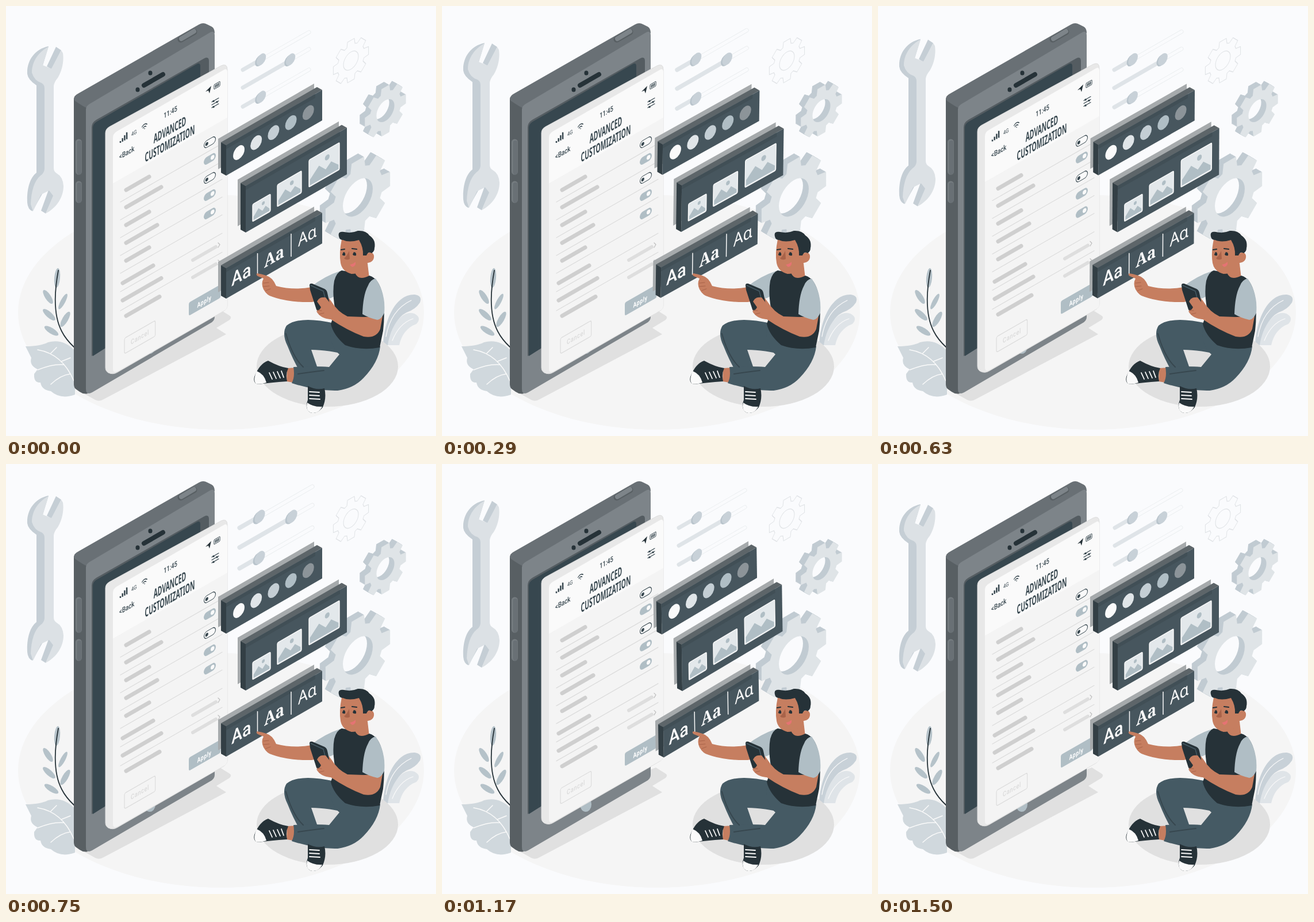
An HTML page that plays this animation: 748 by 748 pixels, repeating every 1540 ms.

```html
<!DOCTYPE html>
<html lang="en">
<head>
<meta charset="utf-8">
<style>
  html, body { margin: 0; width: 100%; height: 100%; overflow: hidden; background: #fafbfd; }
  svg { display: block; width: 100vw; height: 100vh; }
  text { font-family: Roboto, Arial, sans-serif; fill: #37474f; }
  .title { font: bold 22px "Noto Sans", sans-serif; text-anchor: middle; }
  .mid { text-anchor: middle; }
  .line { fill: none; stroke-linecap: round; stroke-linejoin: round; }
  .skin { fill: #c67e60; }
  .dark { fill: #263238; }
  .sleeve { fill: #b0bec5; }
  .pants { fill: #455a64; }
</style>
</head>
<body>
<svg viewBox="0 0 748 748">
  <ellipse cx="374" cy="533" rx="353" ry="204" fill="#f5f5f5"/>
  <g id="sliders"></g>
  <g id="gears"></g>
  <g id="wrench">
    <path fill="#c5ced5" d="M74 70C50 75 36 95 37 118Q38 128 53 138V290C41 299 36 320 37 342Q38 354 46 357L68 318V130L64 103ZM96 77L87 71L71 105L79 110ZM69 361L61 356L74 320L84 327Z"/>
    <path fill="#dce1e5" d="M74 71C58 79 45 95 45 116Q49 130 62 134Q67 137 67 143V284Q66 291 60 295C49 304 44 322 43 345L47 357L61 328L75 321L82 330L69 361C88 351 100 333 100 313Q99 297 88 291Q83 288 83 282V139Q84 132 90 125C98 112 101 95 99 82L96 77L79 109L64 103Z"/>
  </g>

  <path fill="#d0d8dd" d="M34 592Q60 592 73 585Q100 578 120 600V676Q95 685 78 670Q62 668 60 655Q48 656 49 640L55 632Q40 625 44 612Z"/>
  <path class="line" stroke="#fafafa" stroke-width="1.5" d="M55 598Q98 605 118 652M78 604L88 594M97 618L112 612M55 633Q82 622 101 624M78 658Q95 642 112 640"/>
  <g id="sprig" fill="#b5c2c9"></g>
  <path class="line" stroke="#263238" stroke-width="1.8" d="M91 460Q78 530 97 566Q104 580 119 594"/>

  <path fill="#c8d1d8" d="M656 590C658 545 678 501 711 502Q725 504 720 516Q712 528 697 533C676 544 672 566 669 590Z"/>
  <path fill="#dfe4e8" d="M664 590C670 553 690 529 710 535Q724 542 714 553Q690 562 684 590Z"/>
  <path class="line" stroke="#fafafa" stroke-width="1.2" d="M661 575Q669 529 705 512M672 582Q684 552 708 544"/>

  <path fill="#e0e0e0" d="M137 675L155 685Q162 689 170 684L383 571L366 560L389 546Q394 541 388 538L372 528L340 540Z"/>
  <path fill="#585f63" d="M118 160L142 174V674Q135 676 128 671L121 666Q118 663 118 658Z"/>
  <path fill="#697075" d="M118 162Q118 156 126 152L336 32Q343 28 350 32L358 36Q363 39 363 47L140 177Q136 176 120 165Z"/>
  <path fill="#7d8489" d="M139 180Q139 174 146 170L355 46Q363 42 363 51V541Q363 548 355 552L150 672Q139 678 139 666Z"/>
  <path fill="#545c61" d="M149 211Q149 203 157 198L345 91Q353 87 353 96V490L149 609Z"/>
  <path fill="#37474f" d="M151 212Q151 205 158 201L332 101Q338 98 338 105V490L151 609Z"/>
  <g class="line" stroke="#263238">
    <path stroke-width="8" d="M240 138L273 119"/>
    <path stroke-width="7" d="M251 116v1M229 145v1"/>
  </g>
  <path class="line" stroke="#585f63" stroke-width="11" d="M304 58L327 45"/>
  <path class="line" stroke="#7d8489" stroke-width="8" d="M305 57L327 44"/>
  <path class="line" stroke="#757c80" stroke-width="11" d="M126.500 237V288M126.500 310V337"/>
  <path class="line" stroke="#697075" stroke-width="8" d="M127.500 238V289M127.500 311V338"/>
  <ellipse cx="250" cy="592" rx="10" ry="13" fill="#b0bec5"/>

  <g id="card">
    <path fill="#e8e8e8" stroke="#dedede" d="M173 221Q173 214 180 210L374 104Q385 99 385 111V521Q385 527 378 531L194 637Q186 642 178 638Q173 635 173 629Z"/>
    <path fill="#fafafa" d="M186 229Q186 222 193 218L379 111Q385 108 385 115V196L186 309Z"/>
    <path fill="#f4f4f4" d="M186 309L385 194V522Q385 527 379 530L195 635Q186 640 186 631Z"/>
    <g id="content"></g>
  </g>

  <g id="panels"></g>

  <ellipse cx="559" cy="627" rx="123" ry="70" fill="#e0e0e0"/>
  <g id="person">
    <path class="skin" d="M526 658L555 660L554 672L529 672ZM489 630L505 629V656L488 653Z"/>
    <path class="pants" d="M572 552Q510 538 488 556Q479 570 490 592Q505 630 524 655V662Q540 670 556 664L561 648L541 627L531 598Q560 598 600 608Z"/>
    <path class="pants" d="M566 554Q600 560 651 592Q648 620 622 647Q605 665 577 669Q540 670 497 656Q503 645 500 628Q540 626 562 628L580 606Q560 590 566 554Z"/>
    <path class="line" stroke="#37474f" stroke-width="2" d="M553 634Q528 637 508 640M487 570Q498 610 517 628"/>
    <path class="dark" d="M456 617Q476 628 491 630Q486 640 489 653Q460 655 440 658Q429 657 432 645Q441 622 456 617ZM525 661Q540 669 554 665Q558 682 551 698Q541 711 529 707Q519 701 525 685Z"/>
    <path fill="#fafafa" d="M436 635Q449 640 453 655Q442 659 435 657Q429 652 436 635ZM524 690Q535 698 550 697Q544 709 533 708Q520 706 524 690Z"/>
    <path class="line" stroke="#fafafa" stroke-width="1.800" d="M458 638l5 11M465 637l5 11M472 636l5 11M479 635l4 11M528 683l18 1M528 677l17 1M528 671l17 1"/>

    <path class="skin" d="M532 489Q500 495 470 487Q464 472 453 469Q444 466 437 465Q434 467 438 470L448 474Q443 483 448 493Q454 504 464 506Q492 516 532 515Q552 511 563 500Z"/>
    <path class="line" stroke="#a96349" stroke-width="1" d="M448 482L457 481M448 488L458 487M452 495L460 492"/>
    <path class="sleeve" d="M584 460Q553 470 530 489Q540 500 541 514Q560 512 575 503Z"/>

    <path class="skin" d="M607 450L629 448L632 474Q618 487 606 474Z"/>
    <path class="dark" d="M584 460Q595 462 607 464Q613 479 632 469Q649 474 655 502Q660 530 656 565L650 594Q618 600 590 590Q569 572 565 553L573 530Q567 500 571 478Q575 463 584 460Z"/>
    <path class="skin" d="M584 406Q579 430 582 447Q585 462 601 466Q622 466 629 447Q641 445 640 434Q638 426 629 430L624 406Z"/>
    <path fill="#a96349" d="M597 426Q593 435 588 439Q592 443 598 440Z"/>
    <path class="line" stroke="#263238" stroke-width="2.200" d="M583 424l6-1M602 422l8 1"/>
    <path class="dark" d="M587 428q4 0 3 6q-5 1-5-2ZM605 428q5 0 4 6q-5 1-6-2Z"/>
    <path fill="#e57373" d="M598 450Q604 449 608 445Q609 453 602 454Z"/>
    <path class="dark" d="M580 404Q575 391 588 393Q601 396 612 391Q626 390 632 399Q644 407 641 421Q641 427 636 430Q630 426 627 434H621Q622 420 614 407Q597 412 586 407Q582 407 580 404Z"/>

    <path class="skin" d="M622 541L594 540Q577 532 566 514Q559 504 551 500L541 525Q548 542 565 545Q593 564 622 575Q644 579 651 562L655 540Z"/>
    <path class="sleeve" d="M643 474Q661 500 658 534Q653 545 646 546Q632 543 620 536Q621 502 630 486Q634 476 643 474Z"/>
    <path class="dark" d="M528 486Q528 482 533 483L554 492Q558 494 559 499L565 527Q565 530 561 530L546 532Q542 532 540 528L529 494Z"/>
    <path class="line" stroke="#455a64" stroke-width="1.500" d="M530 486L552 496L560 527"/>
    <path class="skin" d="M541 514Q545 505 556 507L564 517L576 530L565 545Q547 544 540 531Q546 529 548 524Z"/>
    <path class="line" stroke="#a96349" stroke-width="1" d="M541 529L549 530M545 536L553 534"/>
  </g>
</svg>
<script>
const $ = id => document.getElementById(id);
const SLOPE = 0.575;
// Places drawing on the upright isometric plane at (x, y).
const iso = (x, y, k = 0.866) => `transform="matrix(${k} ${-k * SLOPE} 0 1 ${x} ${y})"`;
const poly = (pts, fill) => `<polygon points="${pts.join(' ')}" fill="${fill}"/>`;
const slant = (x, y, w, color, width) =>
  `<path class="line" d="M${x} ${y}l${w} ${-w * SLOPE}" stroke="${color}" stroke-width="${width}"/>`;
const label = (x, y, str, size, attrs = '', k) =>
  `<text ${iso(x, y, k)} font-size="${size}" ${attrs}>${str}</text>`;

function slider(y, knobX, knobY) {
  const w = 527 - knobX;
  return slant(412, y, knobX - 412, '#dfe4e8', 7) +
    slant(knobX, knobY, w, '#eceff1', 7) + slant(knobX, knobY, w, '#fafbfd', 5) +
    `<circle r="9" ${iso(knobX - 2, knobY + 1)} fill="#b9c4cc"/>
     <circle r="9.5" ${iso(knobX + 1, knobY - 1)} fill="#c8d1d8"/>`;
}
$('sliders').innerHTML = slider(111, 443, 94) + slider(142, 494, 94) + slider(175, 443, 159);

function gearPath(r, hole) {
  const pts = [];
  for (let i = 0; i < 8; i++)
    for (const [da, k] of [[-0.3, 0.76], [-0.19, 1], [0.19, 1], [0.3, 0.76]]) {
      const a = i * Math.PI / 4 + da;
      pts.push([r * k * Math.cos(a), r * k * Math.sin(a)]);
    }
  return `M${pts.join('L')}ZM${hole} 0A${hole} ${hole} 0 1 0 ${-hole} 0A${hole} ${hole} 0 1 0 ${hole} 0Z`;
}
function gear(x, y, r, hole, depth) {
  const d = gearPath(r, hole);
  const copy = (dx, fill) =>
    `<path d="${d}" ${iso(x - dx, y - dx * SLOPE)} fill="${fill}" fill-rule="evenodd"/>`;
  let out = '';
  for (let dx = depth; dx > 0; dx--) out += copy(dx, '#c1cbd2');
  return out + copy(0, '#dfe4e7');
}
$('gears').innerHTML =
  `<path d="${gearPath(36, 15)}" ${iso(600, 95)} fill="none" stroke="#e0e3e6" stroke-width="1.2"/>` +
  gear(660, 182, 42, 18, 9) + gear(612, 333, 66, 30, 10);

$('sprig').innerHTML = [[89, 473, 5, 17, 5], [73, 506, 5, 14, -33], [99, 514, 4, 15, 28],
  [75, 537, 5, 14, -48], [103, 545, 5, 15, 30], [79, 565, 5, 14, -58]]
  .map(([x, y, rx, ry, a]) => `<ellipse rx="${rx}" ry="${ry}" transform="translate(${x} ${y}) rotate(${a})"/>`).join('');

function toggle(y, on) {
  const color = on ? '#b0bec5' : '#37474f';
  return `<g ${iso(354.5, y)}><rect x="-11.500" y="-6" width="23" height="12" rx="6"
    fill="${on ? color : '#fafafa'}" stroke="${color}" stroke-width="1.200"/>
    <circle cx="${on ? 5.5 : -6}" r="${on ? 3.8 : 3}" fill="${on ? '#fafafa' : color}"/></g>`;
}
function cardContent() {
  let out = label(286, 189, '11:45', 13, 'class="mid" font-weight="500"', 0.72) +
    label(218, 227, '4G', 10, '', 0.75) + label(197, 267, '&lt;Back', 13, 'font-weight="500"', 0.74) +
    `<text class="title" ${iso(285, 223, 0.47)}>ADVANCED</text>
     <text class="title" ${iso(285, 247, 0.47)}>CUSTOMIZATION</text>`;
  for (let i = 0; i < 4; i++)
    out += `<path d="M${199 + i * 3.700} ${238 - i * 2.100}v${-3 - i * 3}" stroke="#37474f" stroke-width="2.500"/>`;
  out += `<g ${iso(241, 211)} class="line" stroke="#37474f" stroke-width="1.500">
      <path d="M-5-3Q0-8 5-3M-3 0Q0-3 3 0M0 2v.5"/></g>
    <path class="dark" d="M347 149L357 139L354 152L352 147Z"/>
    <g ${iso(367, 138)}><rect x="-6" y="-4" width="12" height="8" rx="1.500" fill="none" stroke="#37474f"/>
      <path d="M-4-2.500h2v5h-2zM-1-2.500h2v5h-2zM2-2.500h2v5h-2z" fill="#37474f"/></g>`;
  for (let i = 0; i < 3; i++) {
    out += slant(358, 167 + i * 5, 12, '#37474f', 1.2) +
      `<circle cx="${i == 1 ? 367 : 361}" cy="${i == 1 ? 167 : 165.500 + i * 5}" r="1.700" fill="#37474f"/>`;
  }
  for (const y of [341, 372, 403, 434, 465, 497, 530]) out += slant(199, y, 177, '#dcdcdc', 1.3);
  [[209, 320, 40], [209, 350, 61], [209, 381, 40], [209, 412, 54], [209, 443, 40],
   [203, 482, 53], [203, 512, 67], [209, 539, 58]].forEach(b => out += slant(...b, '#cfcfcf', 7));
  [237, 266, 299, 329, 361].forEach((y, i) => out += toggle(y, i % 2 || i == 4));
  for (const y of [442, 472])
    out += slant(325, y, 40, '#dedede', 6) +
      `<path class="line" d="M369 ${y - 30}l3 3l-3 5" stroke="#bdbdbd" stroke-width="1.200"/>`;
  return out + `<g ${iso(318, 516)}><rect width="64" height="23" rx="3" fill="#b0bec5"/></g>` +
    label(345, 518, 'Apply', 12, 'class="mid" font-weight="bold" letter-spacing=".7" style="fill:#fff"', 0.74) +
    `<g ${iso(206, 578)}><rect width="62" height="27" rx="3" fill="none" stroke="#dcdcdc" stroke-width="1.300"/></g>` +
    label(233, 580, 'Cancel', 12, 'class="mid" font-weight="500" letter-spacing=".7" style="fill:#dadada"', 0.78);
}
$('content').innerHTML = cardContent();

function plate(x, y, w, h) {
  const rise = w * SLOPE, quad = (x, y, fill) =>
    poly([[x, y], [x + w, y - rise], [x + w, y - rise + h], [x, y + h]], fill);
  return quad(x - 14, y - 11, '#a6aaac') +
    poly([[x - 9, y - 5], [x + w - 9, y - rise - 5], [x + w, y - rise], [x, y]], '#5d6569') +
    poly([[x - 9, y - 5], [x, y], [x, y + h], [x - 9, y + h - 5]], '#333f45') +
    quad(x, y, '#47565e') +
    poly([[x, y], [x + w - 12, y - rise + 7], [x + w - 12, y - rise + 14], [x, y + 7]], '#414f56');
}
function picture(x, y, w, h) {
  const u = w / 0.866;
  return `<g ${iso(x, y)}><rect width="${u}" height="${h}" rx="2" fill="#e3e8eb" stroke="#fafafa" stroke-width="1.600"/>
    <path fill="#b0bec5" d="M2 ${h - 2}V${h * 0.75}L${u * 0.33} ${h * 0.42}L${u * 0.55} ${h * 0.7}L${u * 0.73} ${h * 0.52}L${u - 2} ${h * 0.8}V${h - 2}Z"/>
    <circle cx="${u * 0.6}" cy="${h * 0.29}" r="${h * 0.1}" fill="#b0bec5"/></g>`;
}
const white = 'style="fill:#fafafa';
$('panels').innerHTML = plate(383, 242, 167, 53) +
  ['#fafafa', '#e0e5e8', '#c4ced4', '#b0bec5', '#8c9499'].map((c, i) =>
    `<circle r="11.5" ${iso(405 + i * 30.2, 255 - i * 17.4)} fill="${c}"/>`).join('') +
  plate(417, 313, 176, 81) +
  picture(429, 345, 31, 30) + picture(472, 311, 42, 38) + picture(527, 268, 53, 47) +
  plate(383, 456, 167, 53) +
  label(392, 488, 'Aa', 33, white + ';font-weight:500"') +
  label(449, 456, 'Aa', 30, white + ';font-family:Noto Serif,serif;font-weight:600"') +
  label(508, 419, 'A\u0251', 30, white + ';font-family:Noto Sans,sans-serif;font-weight:500"') +
  '<path d="M437.500 430v38M496 396v40" stroke="#fafafa" stroke-width="1.500"/>';

// Piecewise linear keyframes: [[time, value], ...]
function keys(t, frames) {
  let [t0, v0] = frames[0];
  for (const [t1, v1] of frames) {
    if (t < t1) return v0 + (v1 - v0) * (t - t0) / (t1 - t0);
    [t0, v0] = [t1, v1];
  }
  return v0;
}
const LOOP = 1540, STEP = 1000 / 24;
const start = performance.now();
function draw(now) {
  const time = Math.max(0, now - start) % LOOP;
  const t = Math.min(36, Math.floor((time + 5) / STEP)) / 36;
  const float = p => keys(p, [[0, 0], [0.5, -15], [1, 0]]);
  const beat = keys(t, [[0, 1], [0.1, 1.1], [0.3, 1], [0.4, 1], [0.5, 1.1], [0.6, 1], [1, 1]]);
  const sway = keys(t, [[0, 0], [0.25, 1], [0.75, -1], [1, 0]]);
  $('wrench').setAttribute('transform', `translate(0 ${float(t)})`);
  $('card').setAttribute('transform', `translate(0 ${float(Math.max(0, t - 1 / 3))})`);
  $('sliders').setAttribute('transform', `translate(469 110) scale(${beat}) translate(-469 -110)`);
  $('panels').setAttribute('transform', `rotate(${sway} 482 324)`);
  requestAnimationFrame(draw);
}
draw(start);
</script>
</body>
</html>
```
